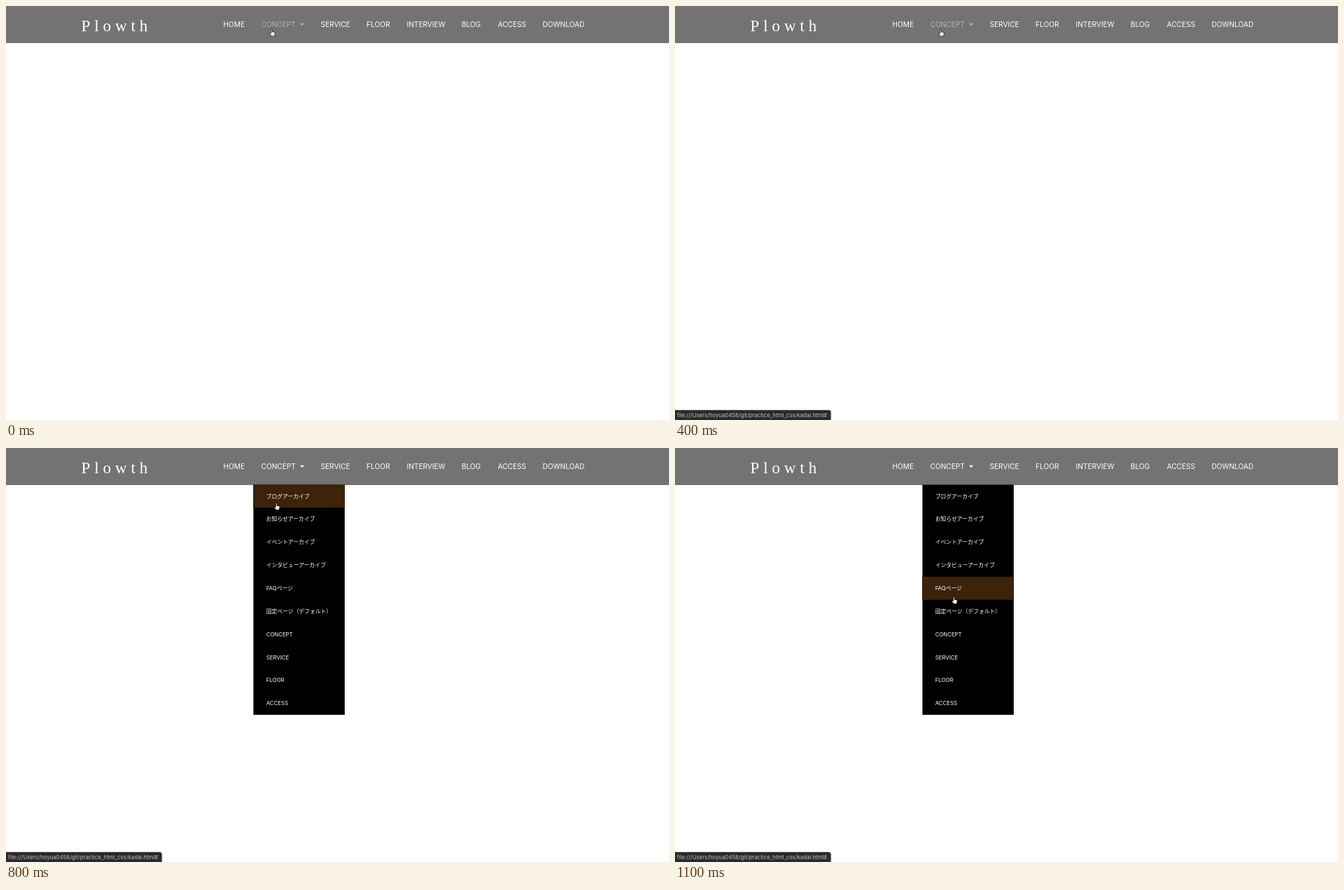
These frames come from a looping animation (947 by 591 pixels, 1200 ms). An HTML page:

```html
<!DOCTYPE html>
<html lang="ja">
<head>
<meta charset="utf-8">
<title>Dropdown menu</title>
<style>
  html, body { margin: 0; width: 100%; height: 100%; overflow: hidden; background: #fff; }
  svg { display: block; width: 100%; height: 100%; }
  text { font-family: Inter, "Noto Sans CJK JP", "Noto Sans CJK", sans-serif; fill: #fff; white-space: pre; }
  .logo { font: 23px "Liberation Serif", "Times New Roman", serif; letter-spacing: 5.9px; }
  #nav text { font-size: 10.15px; }
  #menu text { font-size: 7.8px; }
  #status { filter: drop-shadow(0 0 1px rgba(0, 0, 0, .45)); }
  #status text { font-size: 7.8px; fill: #c2c2c4; }
</style>
</head>
<body>
<svg viewBox="0 0 947 591" preserveAspectRatio="none">
  <rect width="947" height="52.6" fill="#737373"/>
  <rect y="51.6" width="947" height="1" fill="#696969"/>
  <text class="logo" x="107.5" y="35.5">Plowth</text>
  <g id="nav"></g>
  <path id="caret" d="M419.8 24.8h6.4l-3.2 3.2z"/>
  <g id="menu">
    <rect x="353.4" y="52.4" width="130.4" height="328.5"/>
    <rect id="hover" x="353" width="130.8" height="32.85" fill="#3d230b"/>
  </g>
  <g id="status">
    <path d="M0 577H219.5q3 0 3 3V591H0z" fill="#2a2a2c"/>
    <text x="2.8" y="587">file:///Users/hoyua0458/git/practice_html_css/kadai.html#</text>
  </g>
  <g id="hand">
    <path d="M2.5 6.2V1.2a.85.85 0 0 1 1.7 0V4l3.1.7q1.1.3 1 1.5L7.6 8.8l-.6 1.6H3.5L.7 7.1q-.6-1 .4-1.3z"
      fill="#fff" stroke="#000" stroke-width=".75" stroke-linejoin="round"/>
    <path d="M4.4 7v2M5.9 7v2" stroke="#555" stroke-width=".4"/>
  </g>
  <path id="arrow" d="M0 0V9.2L2.1 7.3 3.5 10.6 5 10 3.6 6.8H6.4z"
    fill="#000" stroke="#fff" stroke-width=".7" stroke-linejoin="round"/>
</svg>
<script>
const $ = id => document.getElementById(id);
const ROW_TOP = 52.4, ROW = 32.85, LOOP = 1200;

function addText(parent, x, y, label) {
  const node = document.createElementNS('http://www.w3.org/2000/svg', 'text');
  node.setAttribute('x', x);
  node.setAttribute('y', y);
  node.textContent = label;
  return parent.appendChild(node);
}

const links = [
  ['HOME', 310.5], ['CONCEPT', 364.6], ['SERVICE', 449.5], ['FLOOR', 515],
  ['INTERVIEW', 572.5], ['BLOG', 650.8], ['ACCESS', 702.5], ['DOWNLOAD', 766.5]
].map(([label, x]) => addText($('nav'), x, 30.4, label));

['ブログアーカイブ', 'お知らせアーカイブ', 'イベントアーカイブ', 'インタビューアーカイブ', 'FAQページ',
 '固定ページ（デフォルト）', 'CONCEPT', 'SERVICE', 'FLOOR', 'ACCESS']
  .forEach((label, i) => addText($('menu'), 371.7, ROW_TOP + ROW * (i + .5) + 2.75, label));

const DIM = '#b3b3b3', LIT = '#fff';
// time, pointer, x, y, link colour, menu open, hovered row, status opacity
const steps = [
  [0, 'hand', 376.2, 32.8, DIM, false, -1, 0],
  [100, 'hand', 376.2, 33, DIM, false, -1, .45],
  [200, 'hand', 376.2, 33, DIM, false, -1, .87],
  [400, 'hand', 376.2, 33, DIM, false, -1, 1],
  [500, 'arrow', 383.2, 40.4, DIM, true, -1, 1],
  [600, 'arrow', 384, 48, LIT, true, -1, 1],
  [700, 'hand', 382.3, 61, LIT, true, 0, 1],
  [800, 'hand', 382.8, 78.2, LIT, true, 0, 1],
  [900, 'hand', 384.3, 122, LIT, true, 2, 1],
  [1000, 'hand', 385.8, 146.4, LIT, true, 2, 1],
  [1100, 'hand', 395, 212.2, LIT, true, 4, 1]
];

const show = (id, on) => $(id).setAttribute('visibility', on ? 'visible' : 'hidden');

function draw(time) {
  const [, pointer, x, y, colour, open, row, status] = steps.findLast(step => step[0] <= time);
  for (const id of ['hand', 'arrow']) {
    show(id, id === pointer);
    $(id).setAttribute('transform', `translate(${x} ${y})`);
  }
  links[1].style.fill = $('caret').style.fill = colour;
  show('menu', open);
  show('hover', open && row >= 0);
  $('hover').setAttribute('y', ROW_TOP + ROW * Math.max(row, 0));
  $('status').style.opacity = status;
}

const start = performance.now();
function tick() {
  draw((performance.now() - start) % LOOP);
  requestAnimationFrame(tick);
}
tick();
</script>
</body>
</html>
```
